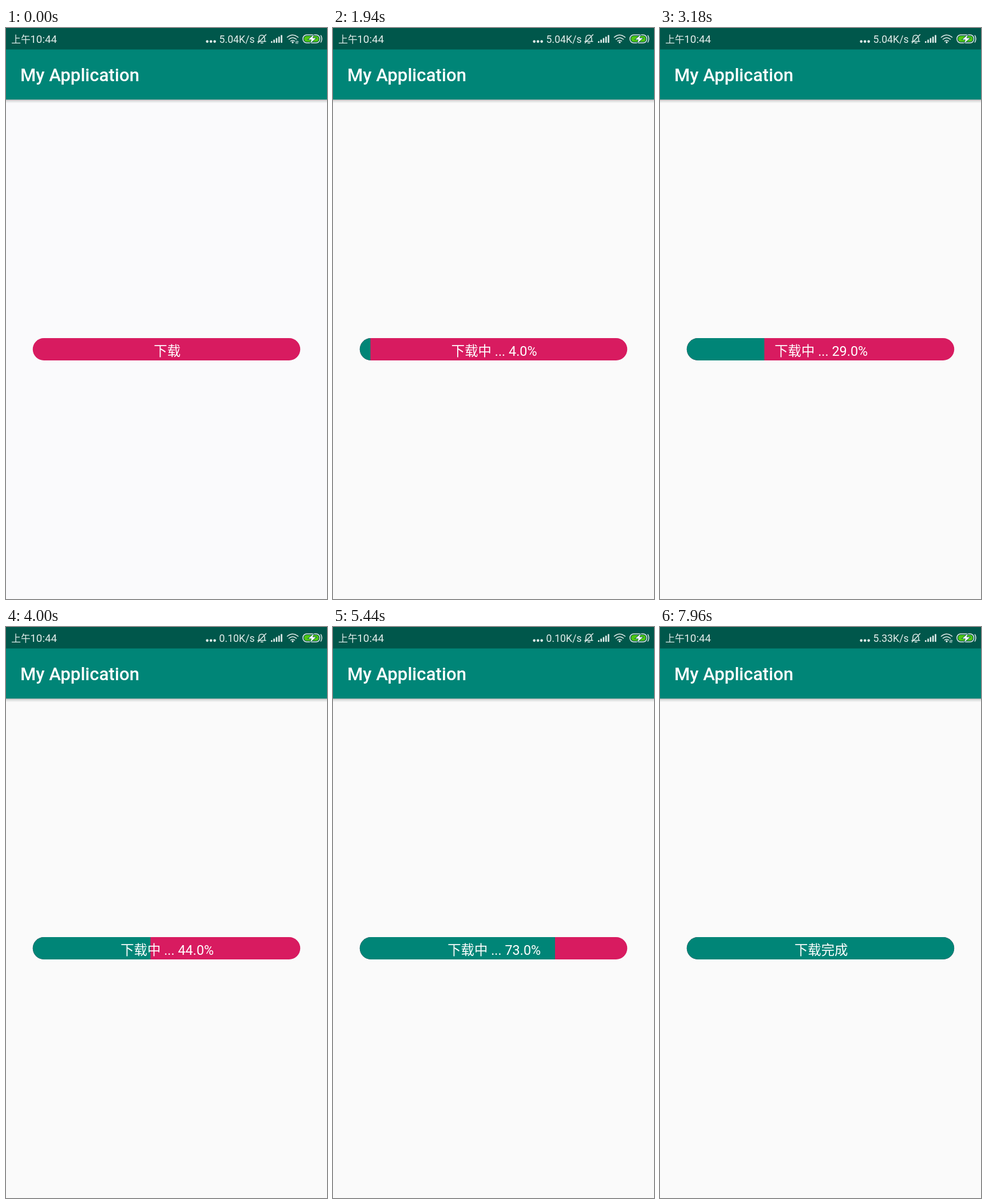
These frames come from a looping animation (561x998 px, 8410 ms). An HTML page:

```html
<!DOCTYPE html>
<html lang="zh-CN">
<head>
<meta charset="utf-8">
<title>Download button</title>
<style>
  html, body { margin: 0; width: 100%; height: 100%; overflow: hidden; }
  svg { display: block; width: 100vw; height: 100vh; }
  text { font-family: Roboto, "Noto Sans CJK SC", "Noto Sans CJK", sans-serif; fill: #fff; }
  .status { fill: #e3edeb; }
  .line { fill: none; stroke: #e3edeb; stroke-width: 1.5; stroke-linecap: round; stroke-linejoin: round; }
</style>
</head>
<body>
<svg viewBox="0 0 561 998">
  <defs>
    <linearGradient id="shade" x2="0" y2="1">
      <stop offset="0" stop-opacity=".34"/>
      <stop offset=".4" stop-opacity=".12"/>
      <stop offset="1" stop-opacity="0"/>
    </linearGradient>
    <clipPath id="pill"><rect x="46.75" y="542" width="467.5" height="39" rx="19.5"/></clipPath>
  </defs>

  <rect id="page" width="561" height="998"/>
  <rect y="124.5" width="561" height="7" fill="url(#shade)"/>
  <rect width="561" height="125" fill="#008577"/>
  <rect width="561" height="37.5" fill="#00574b"/>
  <text x="25" y="93" font-size="31.2" font-weight="500">My Application</text>

  <g class="status">
    <text class="status" x="9.3" y="26" font-size="16.8">上午</text>
    <text class="status" x="42.3" y="26" font-size="18.8">10:44</text>
    <circle cx="351.7" cy="23.6" r="2.3"/>
    <circle cx="358.2" cy="23.6" r="2.3"/>
    <circle cx="364.7" cy="23.6" r="2.3"/>
    <text id="speed" class="status" x="434.6" y="26" font-size="17.7" text-anchor="end"></text>

    <path class="line" d="M440 23.5H454M442 23V18C442 10.500 452 10.500 452 18V23M445.500 26.200H449M440.500 26L454.500 11.500"/>
    <g id="signal"></g>

    <path class="line" stroke-width="2" d="M491.500 16.300Q501 8.300 510.500 16.300M494.500 19.700Q501 14.200 507.500 19.700M497.600 22.900Q501 20.200 504.400 22.900"/>
    <circle cx="501" cy="25" r="1.7"/>
    <path id="arrows" class="line" style="stroke-width:1" d="M507.300 22.800V27M506.300 25.800L507.300 27M509.700 27.300V23M510.700 24.200L509.700 23"/>

    <rect class="line" x="519" y="12" width="29.500" height="14" rx="6.500"/>
    <rect x="521" y="14" width="25.500" height="10" rx="4.500" fill="#4fc614"/>
    <path class="line" d="M550.300 13.200Q553.500 19 550.300 24.800"/>
    <path d="M538 11.500L528.500 20.300H534L531.800 26.800L541.500 17.800H535.700Z" fill="#fff" stroke="#00574b" stroke-width="1.500" paint-order="stroke"/>
  </g>

  <g clip-path="url(#pill)">
    <rect x="46" y="542" width="469" height="39" fill="#d81b60"/>
    <rect id="fill" x="46" y="542" height="39" fill="#008577"/>
  </g>
  <text id="label" x="281.700" y="573" font-size="23.4" text-anchor="middle"></text>
</svg>
<script>
const LOOP = 8410, START = 1770, DONE = 6850;
// [time in ms, percent]: the download rate wavers slightly
const pace = [
  [START, 0], [1940, 4], [2020, 5], [2600, 17], [2640, 18], [3180, 29], [3260, 30],
  [3420, 34], [3550, 35], [4000, 44], [4040, 45], [4370, 52], [4450, 53], [5280, 70],
  [5320, 71], [5440, 73], [5480, 74], [6140, 86], [6190, 87], [6560, 95], [6600, 96],
  [6800, 100], [DONE, 100]
];
const el = id => document.getElementById(id);

el("signal").innerHTML = [0, 1, 2, 3, 4].map(i => {
  const height = 3 + i * 2.7;
  return `<rect x="${463 + i * 4.3}" y="${26 - height}" width="2.6" height="${height}" rx="1"/>`;
}).join("");

function percentAt(t) {
  if (t < START) return 0;
  if (t >= DONE) return 100;
  const next = pace.findIndex(([time]) => time > t);
  const [t0, p0] = pace[next - 1], [t1, p1] = pace[next];
  return Math.floor(p0 + (p1 - p0) * (t - t0) / (t1 - t0) + 1e-6);
}

function setText(id, text) {
  if (el(id).textContent !== text) el(id).textContent = text;
}

function draw() {
  const t = performance.now() % LOOP;
  const percent = percentAt(t);
  setText("label", t < START ? "下载" : t < DONE ? `下载中 ... ${percent.toFixed(1)}%` : "下载完成");
  setText("speed", t < 3960 ? "5.04K/s" : t < 7960 ? "0.10K/s" : "5.33K/s");
  el("fill").setAttribute("width", percent && 0.75 + 4.675 * percent);

  const transferring = t < 1360 || (t >= 4370 && t < 5360) || t >= 7340;
  el("arrows").setAttribute("visibility", transferring ? "visible" : "hidden");

  const tint = 1 - Math.min(1, Math.max(0, (t - 540) / 490));
  el("page").setAttribute("fill", `rgb(250 250 ${250 + Math.round(2 * tint)})`);
  requestAnimationFrame(draw);
}
draw();
</script>
</body>
</html>
```
